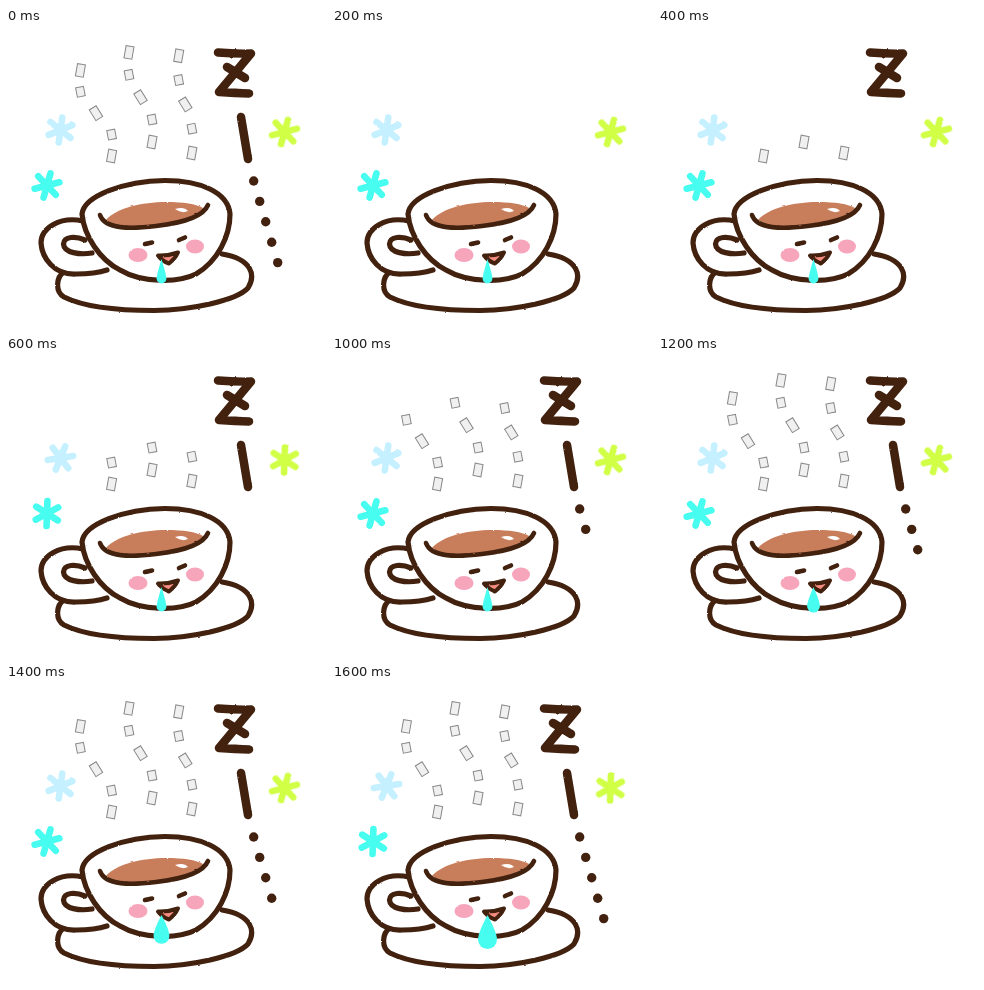
Recreate the animation shown at these times as an HTML page. Size 320x300 px, loop 2000 ms.

```html
<!DOCTYPE html>
<html lang="en">
<head>
<meta charset="utf-8">
<title>Sleepy cup</title>
<style>
  html, body { margin: 0; width: 100%; height: 100%; overflow: hidden; background: #fff; }
  svg { display: block; width: 100vw; height: 100vh; }
  .ink { stroke: #42210f; stroke-linecap: round; stroke-linejoin: round; fill: none; }
  .dot { fill: #42210f; stroke: none; }
  .puff { fill: #f0f0f0; stroke: #888; }
  .flake { fill: none; stroke-width: 6.6; stroke-linecap: round; }
</style>
</head>
<body>
<svg viewBox="0 0 320 300">
  <defs>
    <filter id="rough" filterUnits="userSpaceOnUse" x="0" y="0" width="320" height="300"
        color-interpolation-filters="sRGB">
      <feTurbulence type="fractalNoise" baseFrequency=".25" numOctaves="1" seed="4"/>
      <feDisplacementMap in="SourceGraphic" scale="2" xChannelSelector="R" yChannelSelector="G"/>
    </filter>
  </defs>
  <g id="flakes" filter="url(#rough)"></g>
  <g id="steam"></g>
  <g filter="url(#rough)">
    <g class="ink" stroke-width="5.2">
      <path d="M58 244C50 249 49 264 58 269C80 280 118 282.500 148 282.500C184 282 230 273 242 260C250 247 246 231 216 226"/>
      <path fill="#fff" d="M77 193C54 188 35 200 35 215C36 230 48 247 70 246C82 246 92 245 101 242"/>
      <path d="M79 212C70 208 58 208 57.500 216C58 225 74 227 86 225"/>
      <path fill="#fff" d="M76 186C78 168 118 153 159 152.500C194 152.500 222 164 224 186C224 208 212 233 190 246C172 255 136 255 114 242C94 232 78 208 76 186Z"/>
    </g>
    <path fill="#c97e5b" d="M100 192C110 180 136 174 160 174C178 174 190 176 197 180C192 190 174 197 150 199C126 201 110 199 100 192Z"/>
    <path fill="#fff" d="M169 181Q178 178 182 183Q176 186 169 181Z"/>
    <path class="ink" stroke-width="4.600" d="M94 187C99 202 126 201 150 198C176 195 197 189 202 177"/>
    <ellipse cx="132" cy="227" rx="9.500" ry="7" fill="#f6a5bb"/>
    <ellipse cx="189" cy="218.500" rx="9" ry="7" fill="#f6a5bb"/>
    <path class="ink" stroke-width="4.600" d="M139 216L146 214.500M173 212L179 209.500"/>
    <path class="ink" stroke-width="4" style="fill:#f78c80" d="M152 227.500Q162 228 172 224.500Q169 231 163 235.500Q156 233 152 227.500Z"/>
  </g>
  <path id="drip" fill="#46fdf0"/>
  <g id="snore" class="ink" filter="url(#rough)">
    <path stroke-width="8.500" d="M212 24.500Q230 26 245 25.500L213 64Q230 65 243 65.500M221 39L239 50"/>
    <path stroke-width="8.500" d="M235 89L242 131"/>
  </g>
</svg>
<script>
const $ = id => document.getElementById(id);
const STEP = 200, LOOP = 2000, LAST = 8, COUNT = 5;

function add(parent, tag, attrs = {}) {
  const el = document.createElementNS('http://www.w3.org/2000/svg', tag);
  for (const k in attrs) el.setAttribute(k, attrs[k]);
  return parent.appendChild(el);
}

// Wavy steam columns, grouped in rows that appear from the cup upwards.
const columns = [
  { x: 90, y: 128, sway: 18, rise: 21.4 },
  { x: 134.5, y: 114, sway: 13.3, rise: 22.4 },
  { x: 179.3, y: 125, sway: 7.6, rise: 24.3 }
];
for (let i = 0; i < COUNT; i++) {
  const row = add($('steam'), 'g');
  const h = i % 2 ? 9.5 : 12.5;
  const tilt = 10 - 42 * Math.sin(i * Math.PI / 4) ** 2;
  for (const { x, y, sway, rise } of columns) {
    const px = x + sway * Math.cos((i - 0.5) * Math.PI / 3);
    add(row, 'rect', { class: 'puff', x: -4, y: -h / 2, width: 8, height: h,
      transform: `translate(${px} ${y - i * rise}) rotate(${tilt})` });
  }
}

for (let i = 0; i < COUNT; i++)
  add($('snore'), 'circle', { class: 'dot', cx: 247.7 + i * 6, cy: 153 + i * 20.4, r: 4.7 });

const flakes = [
  { color: '#c5f0ff', x: 54.5, y: 102, tilt: 8, swing: 14 },
  { color: '#46fdf0', x: 41, y: 157.5, tilt: 16, swing: -14 },
  { color: '#d0ff46', x: 278.5, y: 104, tilt: 16, swing: -14 }
];
for (const f of flakes)
  f.el = add($('flakes'), 'path', { class: 'flake', stroke: f.color,
    d: 'M0-12.5V12.5M-11-6.5L11 6.5M-11 6.5L11-6.5' });

function draw(step) {
  for (const group of [$('steam'), $('snore')])
    [...group.children].forEach((el, i) => {
      el.style.display = step === 0 || step >= i + 2 ? '' : 'none';
    });

  const swung = step % 5 >= 3;
  for (const { el, x, y, tilt, swing } of flakes)
    el.setAttribute('transform', `translate(${x} ${y}) rotate(${tilt + (swung ? swing : 0)})`);

  // The drip swells over the last three steps.
  const grow = Math.max(0, step - 5) / 3;
  const r = 4.9 + 4.6 * grow, mid = 255.5 + 9.5 * grow ** 2 - r, neck = mid - r * 0.7;
  $('drip').setAttribute('d', `M155.500 231Q${155.5 - r} ${neck} ${155.5 - r} ${mid}` +
    `a${r} ${r} 0 0 0 ${2 * r} 0Q${155.5 + r} ${neck} 155.500 231Z`);
}

let shown = -1;
function tick() {
  const step = Math.min(LAST, Math.floor(performance.now() % LOOP / STEP));
  if (step !== shown) draw(shown = step);
  requestAnimationFrame(tick);
}
tick();
</script>
</body>
</html>
```
